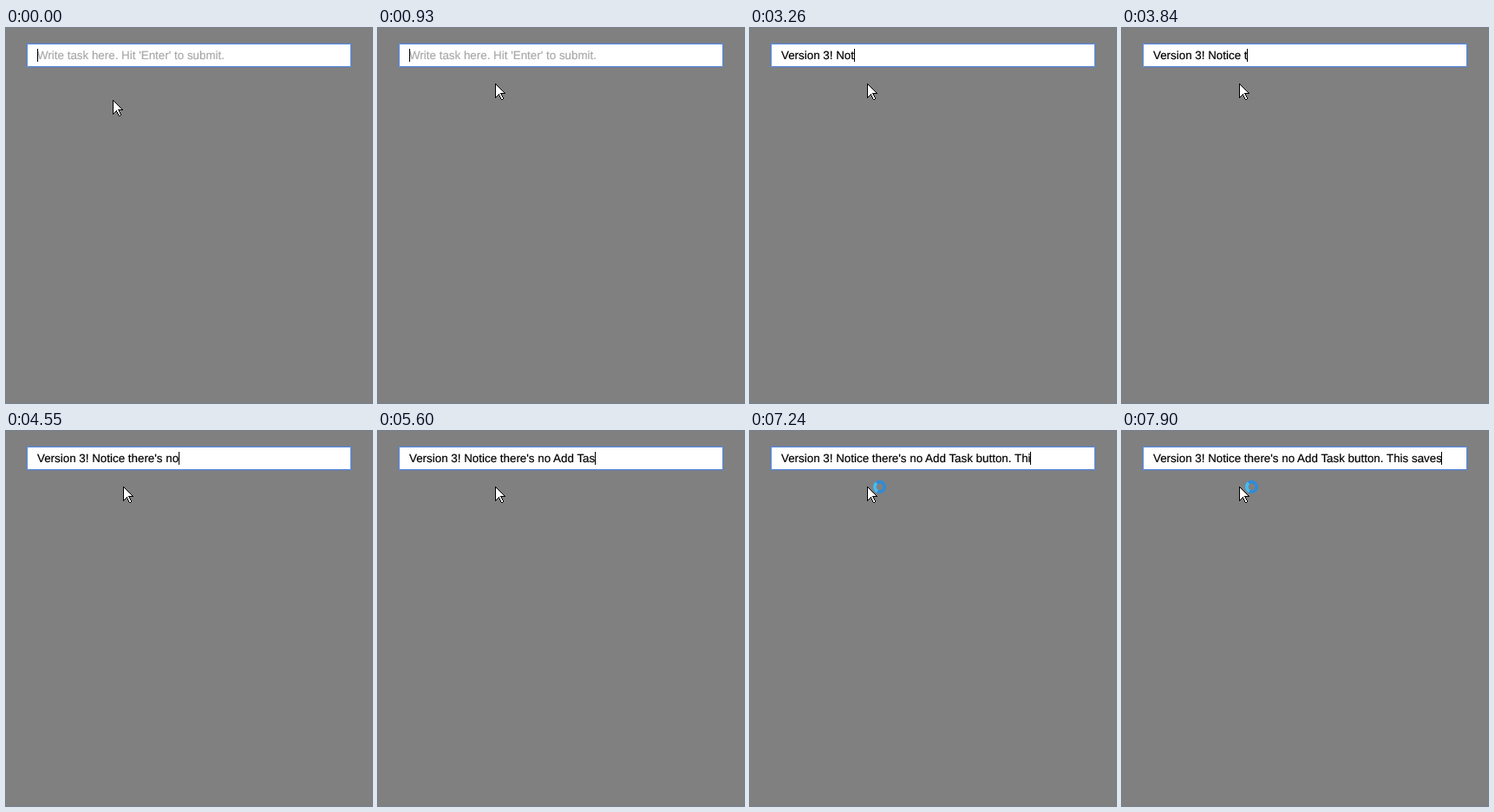
An HTML page for the animation above (8000 ms loop, 422 by 433 pixels).

```html
<!DOCTYPE html>
<html lang="en">
<head>
<meta charset="utf-8">
<title>Task input</title>
<style>
html, body { margin: 0; width: 100%; height: 100%; overflow: hidden; background: #808080; }
#field {
  position: absolute; left: 24px; top: 18px; width: 374px; height: 27px;
  box-sizing: border-box; border: 1px solid #5b8bdc; border-radius: 1px;
  background: #fff; box-shadow: 0 0 0 1px rgba(80, 130, 215, .35);
}
.line {
  position: absolute; left: 36px; top: 24px; height: 15px; white-space: pre;
  font: 13.333px/15px "Liberation Sans", Arial, sans-serif;
  letter-spacing: .02px; text-rendering: geometricPrecision;
  -webkit-text-stroke: .2px; color: #000;
}
#hint { color: #a9a9a9; }
#caret {
  display: inline-block; width: 1px; height: 15px; margin-left: -.45px;
  vertical-align: top; background: #000;
}
svg { position: absolute; left: 0; top: 0; overflow: visible; }
</style>
</head>
<body>
<div id="field"></div>
<div class="line" id="hint">Write task here. Hit 'Enter' to submit.</div>
<div class="line"><span id="typed"></span><span id="caret"></span></div>
<svg width="422" height="433">
  <g id="ring" fill="none" stroke-width="3.6">
    <circle cx="149.5" cy="64.5" r="5.7" stroke="#2b8cdc"/>
    <path d="M147 69.6A5.7 5.7 0 0 1 146 60" stroke="#45bdf2"/>
  </g>
  <path id="arrow" shape-rendering="crispEdges" fill="#fff" stroke="#000"
    d="M.5 .5V16.5L4.5 12.5 6.5 17.5 7.5 18.5H8.5L9.5 17.5 7 11.5H11.5Z"/>
</svg>
<script>
const LOOP = 8000;
const TEXT = "Version 3! Notice there's no Add Task button. This saves";
// Typing rhythm: [ms, characters typed], even speed in between
const PACE = [
  [1220, 1], [1760, 7], [2050, 8], [2190, 9], [2580, 10], [3260, 14], [3550, 16],
  [4550, 28], [4810, 30], [5090, 31], [5600, 36], [6550, 45], [7090, 48], [7900, 56]
];
const el = id => document.getElementById(id);
const show = (id, on) => { el(id).style.visibility = on ? "visible" : "hidden"; };

function typedAt(t) {
  if (t < PACE[0][0]) return 0;
  const next = PACE.findIndex(([at]) => at > t);
  if (next < 0) return TEXT.length;
  const [t0, n0] = PACE[next - 1], [t1, n1] = PACE[next];
  return Math.floor(n0 + (n1 - n0) * (t - t0) / (t1 - t0));
}

function draw(t) {
  const count = typedAt(t);
  el("typed").textContent = TEXT.slice(0, count);
  show("hint", count === 0);
  show("caret", t < 390 || t >= 930);
  show("ring", t >= 6840);
  el("arrow").setAttribute("transform", t < 130 ? "translate(123 83)" : "translate(135 64)");
}

const start = performance.now();
function tick() {
  draw((performance.now() - start) % LOOP);
  requestAnimationFrame(tick);
}
tick();
</script>
</body>
</html>
```
